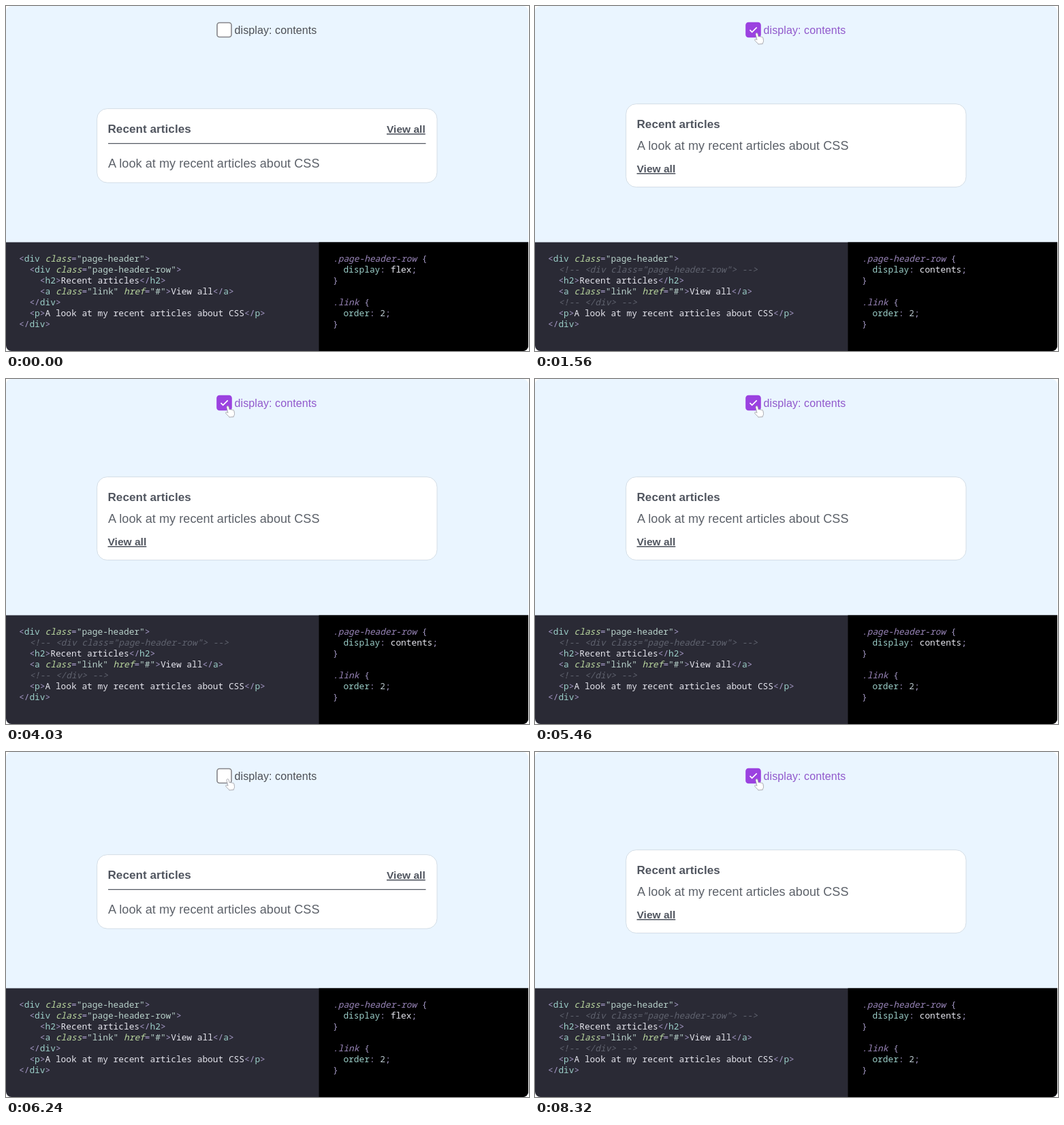
An HTML page that plays this animation: 768 px wide and 506 px high, repeating every 9360 ms.

```html
<!DOCTYPE html>
<html lang="en">
<head>
<meta charset="utf-8">
<title>display: contents</title>
<style>
html, body { margin: 0; width: 100%; height: 100%; overflow: hidden; background: #fff; }
#stage { position: relative; width: 767px; height: 506px; overflow: hidden; border-radius: 8px; background: #eaf5ff; }
svg { position: absolute; left: 0; top: 0; font-family: "Liberation Sans", Arial, sans-serif; }
.title { font-size: 17px; font-weight: 700; letter-spacing: .09px; fill: #50555f; }
.text { font-size: 18px; letter-spacing: .09px; fill: #5c6169; }
.link { font-size: 15.55px; font-weight: 700; fill: #50555f; text-decoration: underline; }
.card { fill: #fff; stroke: #d3dde6; }
#label { font-size: 16px; letter-spacing: .1px; }
pre { position: absolute; top: 362px; margin: 0; color: #e6e6ee;
  font: 500 12.83px/16px "Noto Sans Mono", "DejaVu Sans Mono", monospace; }
#html { left: 19px; }
#css { left: 480px; }
.mark { color: #a79bc8; }
.tag, .prop { color: #9ccfc9; }
.attr { color: #bcd9a0; font-style: italic; }
.str { color: #b9d2cb; }
.note { color: #60636f; font-style: italic; }
.sel { color: #9a86ba; font-style: italic; }
.num { color: #b9c6cc; }
</style>
</head>
<body>
<div id="stage">
  <svg width="768" height="506">
    <path d="M0 346.5H768V506H0z" fill="#2a2a35"/>
    <path d="M459.5 346.5H768V506H459.5z"/>
    <rect id="box" x="310" y="24.5" width="21" height="21" rx="3.5" stroke-width="1.6"/>
    <path id="tick" d="M315.5 35.2l3.2 3.2 7-7" fill="none" stroke="#fff" stroke-width="1.7"/>
    <text id="label" x="335.5" y="40.5">display: contents</text>
    <g id="row">
      <rect class="card" x="133.6" y="150.6" width="499.4" height="108.5" rx="15"/>
      <text class="title" x="149.5" y="186">Recent articles</text>
      <text class="link" x="559" y="186">View all</text>
      <path d="M150 201.7H616.5" stroke="#555a63" stroke-width="1.2"/>
      <text class="text" x="150" y="236.5">A look at my recent articles about CSS</text>
    </g>
    <g id="stack">
      <rect class="card" x="133.6" y="143.6" width="499.4" height="122" rx="15"/>
      <text class="title" x="149.5" y="179">Recent articles</text>
      <text class="text" x="150" y="211">A look at my recent articles about CSS</text>
      <text class="link" x="149.5" y="244">View all</text>
    </g>
    <path id="hand" fill="#fff" stroke="#a2a2a9" stroke-width=".9" stroke-linejoin="round"
      d="M324 41.5q-.2-1.6 1.3-1.9 1.4-.1 1.8 1.4l1 4q1.2-.9 2.3.2 1.3-.8 2.2.4 1.8-.6 2.3 1.3l.6 3.6q.2 2.2-1 3.7l-.2 1.3-6.5.5-.6-1.2q-2.6-1.9-4.4-4.6-.4-1.8 1.6-1.6l1.6 1.1z"/>
  </svg>
  <pre id="html"></pre>
  <pre id="css"></pre>
</div>
<script>
const LOOP = 9360;
const $ = id => document.getElementById(id);

const htmlRule = /(?<note><!--.*?-->)|(?<str>"[^"]*")|(?<attr>class|href)(?==)|(?<=<\/?)(?<tag>\w+)|(?<mark>[<>\/=])/g;
const cssRule = /(?<sel>\.[\w-]+)|(?<prop>[\w-]+)(?=:)|(?<num>\d)|(?<mark>[{}:;])/g;

// Wraps every token in a span named after the group that matched it.
const paint = (code, rule) => code.replace(rule, (token, ...rest) => {
  const groups = rest.at(-1);
  const kind = Object.keys(groups).find(key => groups[key]);
  return `<span class="${kind}">${token.replace(/</g, "&lt;")}</span>`;
});

const markup = on => `<div class="page-header">
${on ? `  <!-- <div class="page-header-row"> -->
  <h2>Recent articles</h2>
  <a class="link" href="#">View all</a>
  <!-- </div> -->` : `  <div class="page-header-row">
    <h2>Recent articles</h2>
    <a class="link" href="#">View all</a>
  </div>`}
  <p>A look at my recent articles about CSS</p>
</div>`;

const styles = on => `.page-header-row {
  display: ${on ? "contents" : "flex"};
}

.link {
  order: 2;
}`;

const show = (id, visible) => $(id).style.display = visible ? "" : "none";

let shown;
function setChecked(on) {
  if (on === shown) return;
  shown = on;
  show("row", !on);
  show("stack", on);
  show("tick", on);
  $("box").setAttribute("fill", on ? "#9b42e0" : "#fff");
  $("box").setAttribute("stroke", on ? "#9b42e0" : "#85858a");
  $("label").setAttribute("fill", on ? "#9058cc" : "#4c4f55");
  $("html").innerHTML = paint(markup(on), htmlRule);
  $("css").innerHTML = paint(styles(on), cssRule);
}

function draw(now) {
  const t = now % LOOP;
  setChecked(t >= 1560 && t < 5590 || t >= 8320);
  show("hand", t >= 1430 && t < 7670 || t >= 8320);
  $("hand").style.opacity = t < 1560 ? .6 : 1;
  requestAnimationFrame(draw);
}
draw(0);
</script>
</body>
</html>
```
